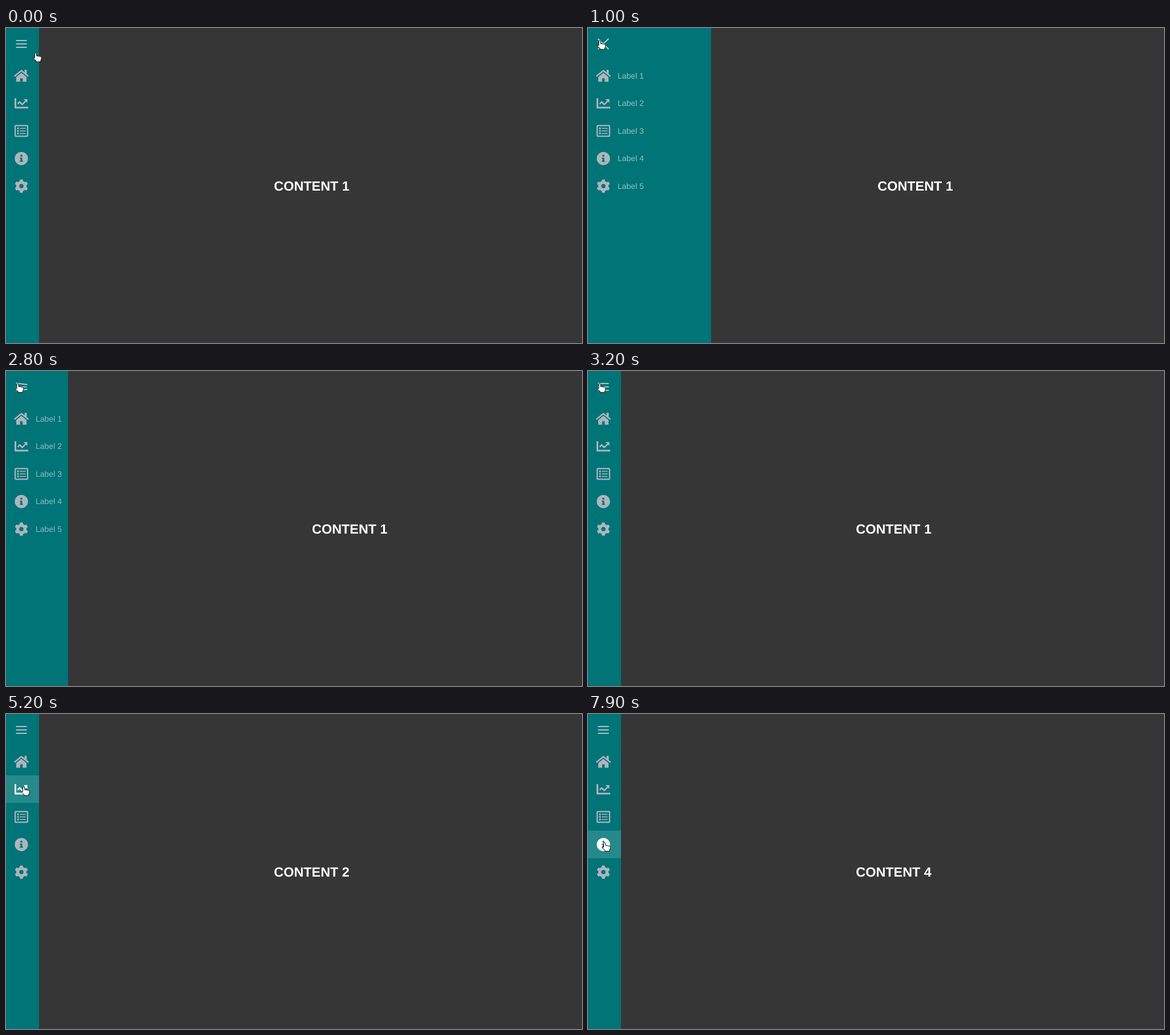
An HTML page that plays this animation: 1011 by 554 pixels, repeating every 8 s.

```html
<!DOCTYPE html>
<html lang="en">
<head>
<meta charset="utf-8">
<title>Collapsible sidebar</title>
<style>
  html, body { margin: 0; width: 100%; height: 100%; overflow: hidden; background: #363636; }
  svg { display: block; }
  text { font-family: "Liberation Sans", Arial, sans-serif; text-rendering: geometricPrecision; }
  #panel { fill: #007477; }
  #burger line { stroke: #d3dadd; stroke-width: 1.6; }
  .item { color: #adb5bd; }
  .back { fill: none; }
  .hover { color: #fff; }
  .hover .back { fill: #fff; fill-opacity: .15; }
  .icon { fill: currentColor; stroke-linejoin: round; }
  .line { fill: none; stroke: currentColor; }
  .label { font-size: 14px; fill: #e4e8ea; }
  #content { font-size: 23.4px; font-weight: bold; fill: #fff; }
  #hand { fill: #fff; stroke: #111; stroke-linejoin: round; }
</style>
</head>
<body>
<svg width="1011" height="554" viewBox="0 0 1011 554">
  <rect id="panel" height="554"/>
  <g id="burger"><line/><line/><line/></g>
  <g id="items"></g>
  <text id="content" y="286"></text>
  <path id="hand" d="M3.5 9.5V2Q5 -.6 6.6 2V6L14 7.2Q15.3 7.6 15.2 9V12L13.8 14V16.4H6V14.8L1 10.4Q.4 8.2 3.5 9.5Z"/>
</svg>
<script>
const LOOP = 8000, STEP = 100, ROW = 48.5, FIRST_ROW = 59.5;
const OPEN_AT = 900, CLOSE_AT = 2717, OPEN_PACE = .75;
const PANEL = { closed: 58, open: 229 };
const $ = id => document.getElementById(id);
const repeat = (list, draw) => list.map(draw).join("");
const line = (width, d) => `<path class="line" stroke-width="${width}" d="${d}"/>`;

// Icons live on a 512 unit grid centred on the origin.
const house = line(54, "M-264 20L0-190 264 20") +
  `<path d="M-192 224V46L0-112 192 46V224H48V96H-48V224Z"/><rect x="120" y="-224" width="80" height="150" rx="12"/>`;
const chart = line(64, "M-224-192V160H256") + line(54, "M-140 23L-64-53 32 43 165-90") +
  `<path d="M80-160H224V-16Z"/>`;
const list = `<rect class="line" x="-232" y="-200" width="464" height="400" rx="24" stroke-width="48"/>` +
  repeat([-96, 0, 96], y => `<circle cx="-128" cy="${y}" r="36"/><rect x="-64" y="${y - 18}" width="224" height="36" rx="12"/>`);
const info = `<path fill-rule="evenodd" d="M-248 0a248 248 0 1 1 496 0a248 248 0 1 1-496 0z
  M-42-104a42 42 0 1 0 84 0a42 42 0 1 0-84 0z M-56 128V80H-32V16H-56V-32H32V80H56V128Z"/>`;
const gear = `<circle class="line" r="138" stroke-width="116"/>` +
  repeat([0, 1, 2, 3, 4, 5], i => `<rect x="-58" y="-248" width="116" height="120" rx="18" transform="rotate(${i * 60})"/>`);

$("items").innerHTML = repeat([house, chart, list, info, gear], (icon, i) => `<g class="item">
  <rect class="back" y="${Math.round(FIRST_ROW + i * ROW)}" width="58" height="${ROW}"/>
  <g class="icon" transform="translate(27 ${84 + i * ROW}) scale(${24 / 512})">${icon}</g>
  <text class="label" x="52" y="${Math.round(88.6 + i * ROW)}">Label ${i + 1}</text></g>`);
const items = [...document.querySelectorAll(".item")];
const labels = [...document.querySelectorAll(".label")];
const bars = [...document.querySelectorAll("#burger line")];

const clicks = [5000, 6900, 7900];
const moves = [
  { from: 0, to: 0, x: 47, y: 43 },
  { from: 100, to: 500, x: 15.5, y: 21.3 },
  { from: 3300, to: 3800, x: 27, y: 116 },
  { from: 4200, to: 4400, x: 26, y: 127 },
  { from: 5500, to: 5900, x: 23, y: 176 },
  { from: 6900, to: 7200, x: 24, y: 225 }
];

const clamp = x => Math.min(1, Math.max(0, x));
const mix = (a, b, p) => a + (b - a) * p;

// CSS "ease": cubic-bezier(.25, .1, .25, 1)
function ease(x) {
  if (x <= 0 || x >= 1) return clamp(x);
  const bezier = (a, b, s) => 3 * a * s * (1 - s) ** 2 + 3 * b * s * s * (1 - s) + s ** 3;
  let low = 0, high = 1;
  for (let i = 0; i < 24; i++) {
    const mid = (low + high) / 2;
    if (bezier(.25, .25, mid) < x) low = mid; else high = mid;
  }
  return bezier(.1, 1, low);
}

const openness = (t, duration) => t < CLOSE_AT
  ? ease((t - OPEN_AT) / (duration * OPEN_PACE))
  : 1 - ease((t - CLOSE_AT) / duration);

function pointerAt(t) {
  return moves.reduce((at, move) => {
    if (t < move.from) return at;
    const p = move.to > move.from ? clamp((t - move.from) / (move.to - move.from)) : 1;
    const smooth = p * p * (3 - 2 * p);
    return { x: mix(at.x, move.x, smooth), y: mix(at.y, move.y, smooth) };
  }, moves[0]);
}

// side is -1, 0 or 1: the outer bars hinge at their left ends, the middle one fades.
function setBar(bar, side, cross) {
  const angle = -side * cross * Math.PI / 4, length = 19 + 7.5 * cross * Math.abs(side);
  const x = 17.5, y = 28 + side * mix(6, 9.2, cross);
  const attributes = {
    x1: x, y1: y, x2: x + length * Math.cos(angle), y2: y + length * Math.sin(angle),
    opacity: side ? 1 : 1 - cross
  };
  for (const name in attributes) bar.setAttribute(name, attributes[name]);
}

function render(t) {
  $("panel").setAttribute("width", Math.round(mix(PANEL.closed, PANEL.open, openness(t, 200))));
  $("content").setAttribute("x", 470.3 + (PANEL.open - PANEL.closed) / 2 * openness(t, 500));
  $("content").textContent = "CONTENT " + (1 + clicks.filter(click => click <= t).length);
  bars.forEach((bar, i) => setBar(bar, i - 1, openness(t, 150)));
  labels.forEach(label => label.setAttribute("opacity", openness(t, 350)));

  const { x, y } = pointerAt(t);
  $("hand").setAttribute("transform", `translate(${x} ${y})`);
  const hovered = Math.floor((y - FIRST_ROW) / ROW);
  items.forEach((item, i) => item.classList.toggle("hover", i === hovered));
}

const start = performance.now();
function frame() {
  const t = (performance.now() - start) % LOOP;
  render(Math.floor(t / STEP) * STEP);
  requestAnimationFrame(frame);
}
frame();
</script>
</body>
</html>
```
